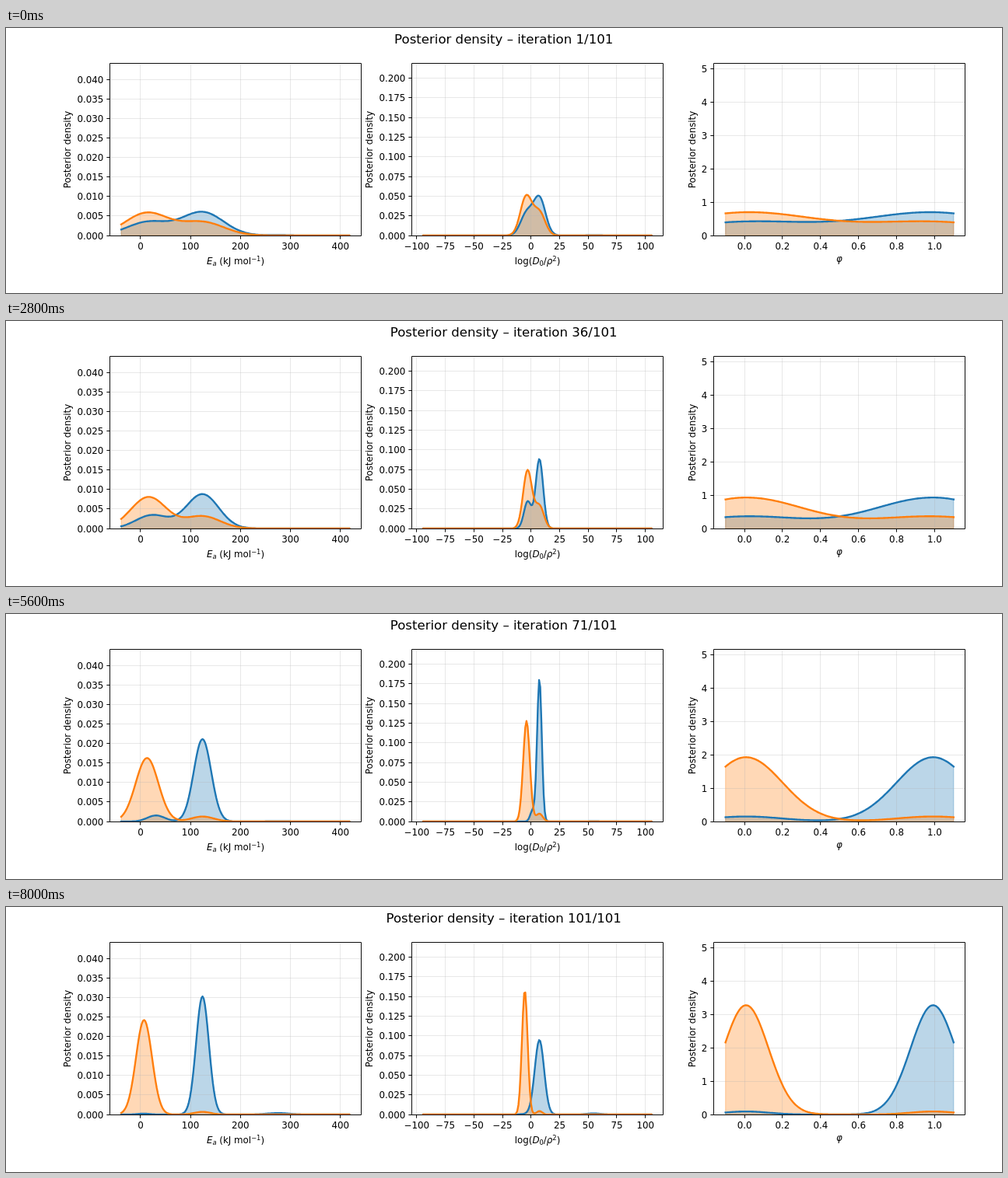
Write an HTML page that moves like this. It is 1280 px wide and 341 px high and loops after 8.08 s.

```html
<!DOCTYPE html>
<html lang="en">
<head>
<meta charset="utf-8">
<title>Posterior density</title>
<style>
  html, body { margin: 0; width: 100%; height: 100%; overflow: hidden; background: #fff; }
  svg { display: block; width: 100vw; height: 100vh; }
  text { font: 11.85px "DejaVu Sans", sans-serif; text-anchor: middle; }
  .title { font-size: 16.59px; }
  .end { text-anchor: end; }
  .small { font-size: 8.3px; }
  i, .it { font-style: italic; }
  .axis { fill: none; stroke: #000; stroke-width: .95; }
  .grid { fill: none; stroke: #b0b0b0; stroke-opacity: .3; stroke-width: .95; }
  .area { fill-opacity: .3; stroke-opacity: .3; stroke-width: 1.185; }
  .line { fill: none; stroke-width: 2.37; stroke-linejoin: round; stroke-linecap: square; }
</style>
</head>
<body>
<svg id="stage" viewBox="0 0 1280 341"></svg>
<script>
const STEPS = 101, STEP_MS = 80, POINTS = 200;
const TOP = 45.5, BASE = 267;
const COLORS = ["#1f77b4", "#ff7f0e"];

const panels = [
  { left: 133.5, right: 456.5, zero: 172.9, sx: 0.642, sy: 5010, from: -38.7, to: 418,
    xt: [0, 400, 100, 0], yt: [0, 0.04, 0.005, 3], high: 124, far: [275, 22], labelX: 83.3,
    label: '<tspan class="it">E</tspan><tspan class="it small" dy="2">a</tspan><tspan dy="-2"> (kJ mol</tspan>' +
           '<tspan class="small" dy="-4.5">−1</tspan><tspan dy="4.5">)</tspan>', labelY: 304.3 },
  { left: 521.5, right: 844.5, zero: 674.8, sx: 1.469, sy: 1013, from: -94.3, to: 105.3,
    xt: [-100, 100, 25, 0], yt: [0, 0.2, 0.025, 3], high: 7.3, far: [55, 6], labelX: 471.4,
    label: 'log(<tspan class="it">D</tspan><tspan class="small" dy="2">0</tspan><tspan dy="-2">/</tspan>' +
           '<tspan class="it">ρ</tspan><tspan class="small" dy="-4.5">2</tspan><tspan dy="4.5">)</tspan>', labelY: 304.3 },
  { left: 909.5, right: 1232.5, zero: 949.1, sx: 244.3, sy: 42.9, from: -0.1, to: 1.1,
    xt: [0, 1, 0.2, 1], yt: [0, 5, 1, 0], high: 0.992, far: [0, 0.15], labelX: 886.4,
    label: '<tspan class="it">φ</tspan>', labelY: 301.2 }
];

// step, swapped share, outlier share, then low mean and width: blue, orange for the
// first panel, blue, orange for the second; last is the width in the third
const keys = [
  [0,   .37,  .006, 15, 42,   13, 43.3, -4,   5.3,  -4.3, 5.1,  .365],
  [21,  .30,  0,    12, 35.4, 13, 37.2, -4.4, 3.85, -4,   4.5,  .31],
  [35,  .28,  0,    23, 32.6, 16, 35.5, -3,   3.26, -3.1, 3.9,  .31],
  [56,  .36,  0,    10, 41.9, 20, 41.7, -5,   4.5,  -3.3, 5.5,  .353],
  [70,  .072, .004, 31, 17.5, 13, 22.7, 1.2,  2.04, -4,   2.9,  .192],
  [79,  .086, .008, 6,  25.9, 13, 30.6, -5.5, 3.45, -3.6, 5.15, .2146],
  [100, .027, .02,  6,  12.8, 7,  16,   -5,   4.1,  -5.5, 2.46, .1184]
];

const stage = document.getElementById("stage");
const snap = v => Math.floor(v) + 0.5;
const fmt = (v, d) => (Math.abs(v) < 1e-9 ? 0 : v).toFixed(d).replace("-", "−");

function ticks([first, last, step]) {
  const count = Math.round((last - first) / step);
  return Array.from({ length: count + 1 }, (_, i) => first + i * step);
}

function panelMarkup(p, n) {
  const bottom = BASE + 0.5;
  let grid = "", marks = "", labels = "";
  for (const v of ticks(p.xt)) {
    const x = snap(p.zero + v * p.sx);
    grid += `M${x} ${TOP}V${bottom}`;
    marks += `M${x} ${bottom}v4.15`;
    labels += `<text x="${p.zero + v * p.sx}" y="285">${fmt(v, p.xt[3])}</text>`;
  }
  for (const v of ticks(p.yt)) {
    const y = snap(BASE - v * p.sy);
    grid += `M${p.left} ${y}H${p.right}`;
    marks += `M${p.left} ${y}h-4.15`;
    labels += `<text class="end" x="${p.left - 8.2}" y="${BASE - v * p.sy + 4.5}">${fmt(v, p.yt[3])}</text>`;
  }
  const width = p.right - p.left;
  const curves = type => COLORS.map(c =>
    `<path class="${type}" stroke="${c}" ${type === "area" ? `fill="${c}"` : ""}/>`).join("");
  return `<clipPath id="clip${n}"><rect x="${p.left}" y="${TOP}" width="${width}" height="${bottom - TOP}"/></clipPath>
    <g id="panel${n}" clip-path="url(#clip${n})">${curves("area")}<path class="grid" d="${grid}"/>${curves("line")}</g>
    <path class="axis" d="${marks}M${p.left} ${TOP}H${p.right}V${bottom}H${p.left}Z"/>${labels}
    <text x="${p.left + width / 2}" y="${p.labelY}">${p.label}</text>
    <text transform="translate(${p.labelX} 156.5) rotate(-90)">Posterior density</text>`;
}

stage.innerHTML = '<text class="title" x="639.7" y="20"></text>' + panels.map(panelMarkup).join("");
const title = stage.querySelector(".title");
const shapes = panels.map((_, n) => ["area", "line"].map(c => stage.querySelectorAll(`#panel${n} .${c}`)));

function stateAt(step) {
  let k = 0;
  while (k < keys.length - 2 && step >= keys[k + 1][0]) k++;
  const a = keys[k], b = keys[k + 1], f = (step - a[0]) / (b[0] - a[0]);
  return a.map((v, i) => v + (b[i] - v) * f);
}

const bell = (x, mean, sd) => Math.exp(-((x - mean) ** 2) / (2 * sd * sd)) / (sd * Math.sqrt(2 * Math.PI));

function drawCurve(n, c, state) {
  const p = panels[n], [, swap, out] = state;
  const [low, sd] = n < 2 ? state.slice(3 + n * 4 + c * 2) : [0.008, state[11]];
  const far = c || n === 2 ? 0 : out;
  const lowShare = c ? 1 - swap : swap - far;
  const highShare = c ? swap : 1 - swap;
  const points = Array.from({ length: POINTS }, (_, i) => {
    const x = p.from + (p.to - p.from) * i / (POINTS - 1);
    const y = lowShare * bell(x, low, sd) + highShare * bell(x, p.high, sd) + far * bell(x, ...p.far);
    return (p.zero + x * p.sx).toFixed(2) + " " + (BASE - y * p.sy).toFixed(2);
  });
  const d = "M" + points.join("L");
  const [areas, lines] = shapes[n];
  lines[c].setAttribute("d", d);
  areas[c].setAttribute("d", `${d}V${BASE}H${p.zero + p.from * p.sx}Z`);
}

let shown = -1;
function frame() {
  const step = Math.floor(performance.now() / STEP_MS) % STEPS;
  if (step !== shown) {
    shown = step;
    title.textContent = `Posterior density – iteration ${step + 1}/${STEPS}`;
    const state = stateAt(step);
    panels.forEach((_, n) => COLORS.forEach((_, c) => drawCurve(n, c, state)));
  }
  requestAnimationFrame(frame);
}
frame();
</script>
</body>
</html>
```
